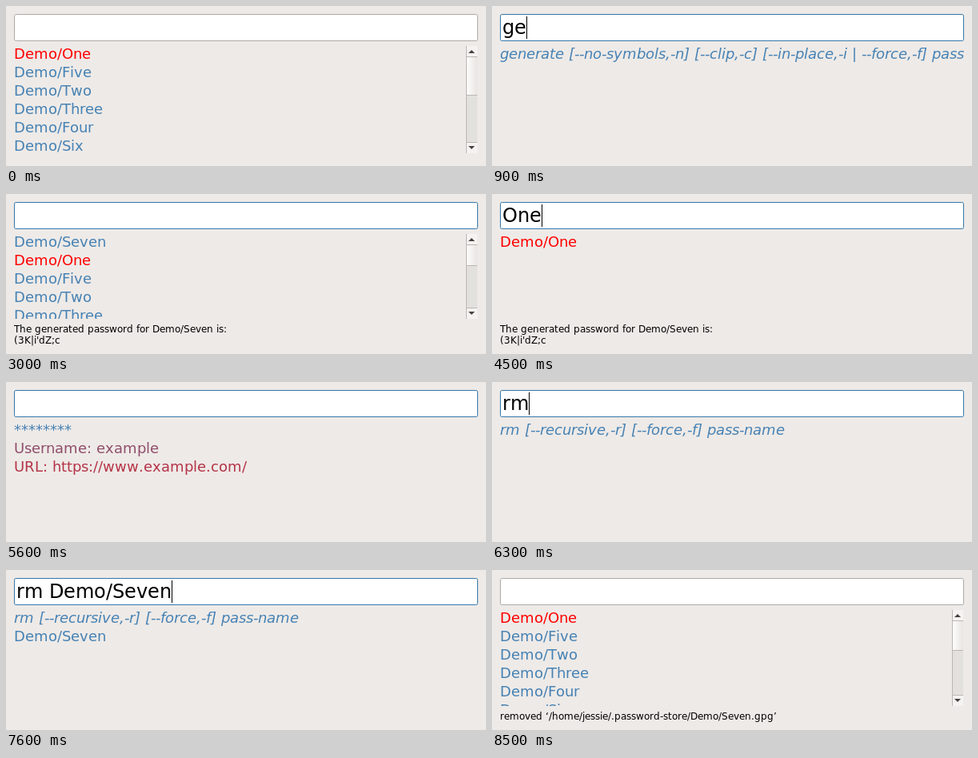
Recreate the animation shown at these times as an HTML page with a canvas. Size 600x200 px, loop 8600 ms.

```html
<!DOCTYPE html>
<html lang="en">
<head>
<meta charset="utf-8">
<title>Password manager demo</title>
<style>
  html, body { margin: 0; width: 100%; height: 100%; overflow: hidden; background: #eeeae7; }
  canvas { display: block; }
</style>
</head>
<body>
<canvas id="stage" width="600" height="200"></canvas>
<script>
const ctx = document.getElementById('stage').getContext('2d');
const LOOP = 8600, STEP = 100;
const BLUE = [70, 130, 180], RED = [255, 0, 0];
const FONT = '"DejaVu Sans", sans-serif';
const LEFT = 10, RIGHT = 590, LIST_TOP = 50, ROW = 23, COMMANDS = 7;

const NAMES = ['One', 'Five', 'Two', 'Three', 'Four', 'Six'].map(n => 'Demo/' + n);
const HELP = {
  generate: 'generate [--no-symbols,-n] [--clip,-c] [--in-place,-i | --force,-f] pass',
  rm: 'rm [--recursive,-r] [--force,-f] pass-name'
};
const TYPING = [
  { from: 800, to: 3000, text: 'generate Demo/Seven 10' },
  { from: 4300, to: 5000, text: 'One' },
  { from: 6200, to: 8100, text: 'rm Demo/Seven' }
];
const MESSAGES = [
  { from: 3000, to: 5000, lines: ['The generated password for Demo/Seven is:', "(3K|i'dZ;c"] },
  { from: 8100, to: LOOP, lines: ['removed ‘/home/jessie/.password-store/Demo/Seven.gpg’'] }
];
const DETAILS = {
  from: 5000, to: 6000,
  lines: ['********', 'Username: example', 'URL: https://www.example.com/'],
  moves: [5150, 5450], fade: 250
};

const active = (list, t) => list.find(e => t >= e.from && t < e.to);
const clamp = v => Math.max(0, Math.min(1, v));
const mix = k => `rgb(${BLUE.map((c, i) => Math.round(c + (RED[i] - c) * k))})`;

// Whole-pixel glyph advances, as in hinted text; returns the end position.
function write(text, x, y, size, color, style = '') {
  ctx.font = `${style} ${size}px ${FONT}`;
  ctx.fillStyle = color;
  for (const ch of text) {
    ctx.fillText(ch, x, y);
    x += Math.round(ctx.measureText(ch).width);
  }
  return x;
}

function box(x, y, w, h, color) {
  ctx.fillStyle = color;
  ctx.fillRect(x, y, w, h);
}

function drawField(t, entry) {
  const focused = t >= 100 && t < 8400;
  ctx.beginPath();
  ctx.roundRect(10.5, 10.5, 579, 33, 2);
  ctx.fillStyle = '#fff';
  ctx.fill();
  ctx.strokeStyle = focused ? '#3478ac' : '#aeaaa6';
  ctx.lineWidth = 1;
  ctx.stroke();
  if (!entry) return;
  const typed = entry.text.slice(0, Math.floor((t - entry.from) / STEP) + 1);
  const end = write(typed, 13, 35, 24, '#000');
  const idle = t - entry.from - (entry.text.length - 1) * STEP;
  if (idle < 500) box(end, 13, 1, 28, '#000');
}

function arrow(y, dir) {
  ctx.beginPath();
  ctx.moveTo(578, y + 2 * dir);
  ctx.lineTo(586, y + 2 * dir);
  ctx.lineTo(582, y - 2 * dir);
  ctx.fillStyle = '#46423e';
  ctx.fill();
}

function drawScrollbar(bottom, rowCount) {
  const top = LIST_TOP + 14, end = bottom - 14, track = end - top;
  const thumb = Math.round(track * (bottom - LIST_TOP) / (rowCount * ROW));
  const shine = ctx.createLinearGradient(576, 0, 589, 0);
  shine.addColorStop(0, '#fdfdfc');
  shine.addColorStop(1, '#e8e5e2');
  box(575, LIST_TOP, 14, bottom - LIST_TOP, '#e3e1de');
  box(575, LIST_TOP, 14, 14, '#f5f3f1');
  box(575, end, 14, 14, '#f5f3f1');
  box(575, top, 14, thumb, shine);
  box(575, LIST_TOP, 1, bottom - LIST_TOP, '#bbb7b2');
  for (const y of [top - 1, top + thumb - 1, end]) box(575, y, 14, 1, '#bbb7b2');
  arrow(57, 1);
  arrow(bottom - 7, -1);
}

function listRows(t, entry) {
  const names = t >= 3000 && t < 8100 ? ['Demo/Seven', ...NAMES] : NAMES;
  const nameRow = (text, red) => ({ text, color: mix(red ? 1 : 0) });
  if (!entry) return names.map(n => nameRow(n, n === 'Demo/One'));

  const typed = entry.text.slice(0, Math.floor((t - entry.from) / STEP) + 1);
  const [word, ...rest] = typed.split(' ');
  const command = Object.keys(HELP).find(c => c.startsWith(word));
  const query = rest.length ? rest.join(' ') : word;
  const rows = names.filter(n => n.includes(query)).map((n, i) => nameRow(n, !command && i === 0));
  if (command) rows.unshift({ text: HELP[command], color: mix(0), style: 'italic' });
  return rows;
}

function detailRows(t) {
  const { lines, moves, fade } = DETAILS;
  const progress = moves.map(m => clamp((t - m) / fade));
  return lines.map((text, i) => {
    const arrived = i ? progress[i - 1] : 1;
    const left = i < progress.length ? progress[i] : 0;
    return { text, color: mix(arrived * (1 - left)) };
  });
}

function draw(t) {
  const entry = active(TYPING, t);
  const message = active(MESSAGES, t);
  const details = active([DETAILS], t);
  const lines = message ? message.lines : [];
  const bottom = 184 - 14 * lines.length;
  const rows = details ? detailRows(t) : listRows(t, entry);
  const rowCount = rows.length + (entry || details ? 0 : COMMANDS);

  box(0, 0, 600, 200, '#eeeae7');
  drawField(t, entry);

  ctx.save();
  ctx.beginPath();
  ctx.rect(LEFT - 1, LIST_TOP, RIGHT - LEFT + 1, bottom - LIST_TOP);
  ctx.clip();
  rows.forEach((r, i) => write(r.text, LEFT, 66 + ROW * i, 18, r.color, r.style));
  ctx.restore();

  if (rowCount * ROW > bottom - LIST_TOP) drawScrollbar(bottom, rowCount);
  lines.forEach((l, i) => write(l, LEFT, bottom + 17 + 14 * i, 12, '#000'));
}

const start = performance.now();
function tick() {
  const t = (performance.now() - start) % LOOP;
  draw(Math.floor(t / STEP) * STEP);
  requestAnimationFrame(tick);
}
tick();
</script>
</body>
</html>
```
